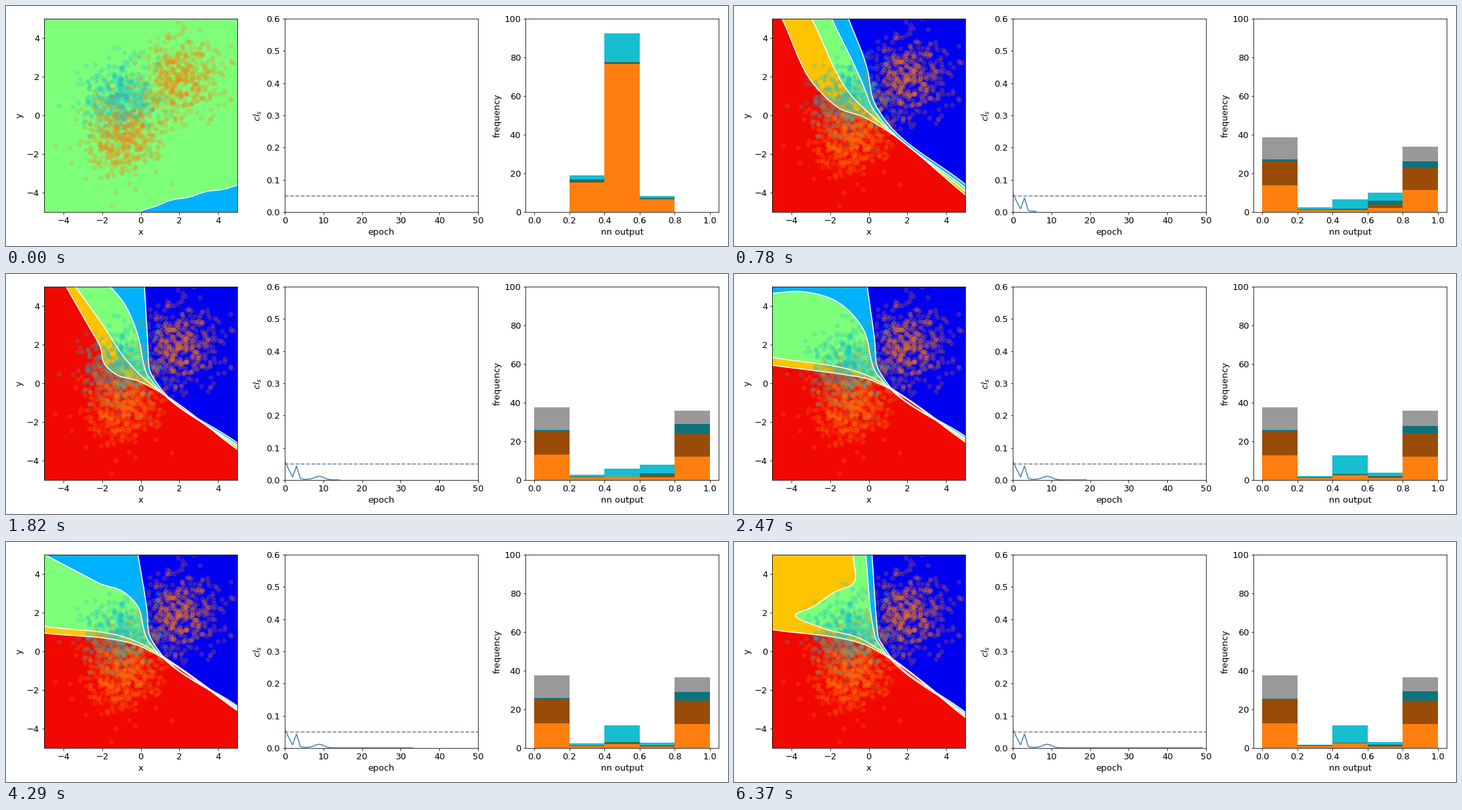
A matplotlib script for the animation above (6500 ms loop, 1080x360 px).

```python
import numpy as np
import matplotlib.pyplot as plt
from matplotlib.animation import FuncAnimation
from matplotlib.patches import Polygon
from matplotlib.path import Path

EPOCHS = 50
POINTS = 500
BINS = np.arange(5) * 0.2 + 0.1
BANDS = plt.get_cmap("jet")(BINS)
OUTSIDE = [(12, -12), (-12, -12), (-12, 12)]

plt.rcParams["font.size"] = 13


def unit(v):
    return v / np.hypot(*v)


def spline(points):
    """Smooth curve with fixed numbers of samples before and after the bend."""
    p = np.array(points, float)
    p = np.vstack([p[0] + 5 * unit(p[0] - p[1]), p, p[-1] + 4 * unit(p[-1] - p[-2])])
    t = np.append(0, np.cumsum(np.hypot(*np.diff(p, axis=0).T)))
    m = np.gradient(p, t, axis=0)
    u = np.append(np.linspace(0, t[-3], 120), np.linspace(t[-3], t[-1], 40)[1:])
    i = np.clip(np.searchsorted(t, u, side="right") - 1, 0, len(t) - 2)
    h = (t[i + 1] - t[i])[:, None]
    s = (u - t[i])[:, None] / h
    return ((2 * s**3 - 3 * s**2 + 1) * p[i] + (s**3 - 2 * s**2 + s) * h * m[i]
            + (3 * s**2 - 2 * s**3) * p[i + 1] + (s**3 - s**2) * h * m[i + 1])


def contour(head, corner, end, r=0.42):
    """From head to a rounded corner, then straight on to end."""
    corner, end = np.array(corner), np.array(end)
    return spline([*head, corner + r * unit(np.array(head[-1]) - corner),
                   corner + r * unit(end - corner), end])


stages = []


def stage(epoch, corner, step, end, gap, *heads):
    """Contours 0.2 to 0.8: corners and right ends are evenly spaced."""
    stages.append((epoch, np.array([
        contour(head, np.add(corner, np.multiply(i, step)), (5, end - i * gap))
        for i, head in enumerate(heads)])))


stage(0, (1.2, 0.8), (-0.5, -0.9), -2, 1.3,
      [(0.2, 5)], [(-2.5, 5)], [(-5, 2)], [(-5, -1)])
stage(6, (0.4, 0.2), (-0.11, -0.13), -3.57, 0.18,
      [(-1.05, 5), (-0.1, 2.5)],
      [(-1.92, 5), (-0.2, 1.35)],
      [(-2.96, 5), (-0.75, 0.85)],
      [(-4.49, 5), (-2.72, 1.45), (-1.4, 0.3)])
stage(10, (0.48, 0.17), (-0.11, -0.08), -3.35, 0.13,
      [(0.42, 5), (0.44, 0.8)],
      [(0.17, 5), (0.2, 0.7)],
      [(-0.11, 5), (-0.08, 0.7)],
      [(-0.77, 5), (-0.98, 2.9), (-1.71, 1.07), (-1.29, 0.41)])
stage(19, (0.52, 0.37), (-0.09, -0.06), -2.74, 0.1,
      [(-0.08, 5), (0.31, 2.21)],
      [(-5, 4.66), (-3.6, 4.75), (-1.6, 4.2), (-0.25, 2.73), (0.2, 0.95)],
      [(-5, 1.34), (-0.4, 0.53)],
      [(-5, 0.93), (-0.4, 0.31)])
stage(26, (0.52, 0.37), (-0.09, -0.06), -2.67, 0.08,
      [(-0.25, 5), (0.31, 2.21)],
      [(-5, 1.9), (-3.83, 2.1), (-1.36, 2.93), (-0.32, 2.5), (0.2, 0.95)],
      [(-5, 1.13), (-0.4, 0.55)],
      [(-5, 0.89), (-0.4, 0.37)])
stage(40, (0.52, 0.37), (-0.09, -0.06), -2.98, 0.08,
      [(-0.04, 5), (0.34, 2.03)],
      [(-0.6, 5), (0.03, 2.38), (0.2, 1)],
      [(-5, 1.45), (-0.4, 0.6)],
      [(-5, 1), (-0.4, 0.41)])
stage(49, (0.52, 0.37), (-0.09, -0.06), -3.15, 0.09,
      [(0.17, 5), (0.44, 1.17)],
      [(-0.15, 5), (0.24, 1.17)],
      [(-0.81, 5), (-0.81, 3.5), (-1.7, 3.1), (-2.9, 2.3), (-3.79, 1.88),
       (-2.5, 1.24), (-0.4, 0.64)],
      [(-5, 1.12), (-0.4, 0.41)])


def contours_at(epoch):
    for (e0, c0), (e1, c1) in zip(stages, stages[1:]):
        if epoch <= e1:
            break
    w = (epoch - e0) / (e1 - e0)
    if e0 == 0:
        w **= 0.4  # the first steps learn fastest
    return c0 + w * (c1 - c0)


def untrained_contour():
    x = np.linspace(0, 5, 60)
    return np.column_stack([x, -5 + 1.36 * (x / 5) ** 0.75
                            + 0.04 * np.sin(3.5 * x - 4)])


def band_shares(points, paths):
    """Share of the points between each pair of neighbouring contours."""
    inside = [p.contains_points(points).sum() for p in paths]
    return np.clip(-np.diff([POINTS, *inside, 0]), 0, None) / POINTS


def histogram(paths):
    """Expected yields; smoothing loses part of both outermost bins."""
    edge = np.array([1, 0, 0, 0, 1])
    up, down = (50 * band_shares(p, paths) * (1 - 0.48 * edge)
                for p in (bkg_up, bkg_down))
    sig = 20 * band_shares(signal, paths) * (1 - 0.35 * edge)
    return up + down, sig, abs(up - down)


def bump(x, centre, width, height):
    return height * np.exp(-((x - centre) / width) ** 2)


epochs = np.arange(EPOCHS)
loss = (bump(epochs, 0, 1.35, 0.056) + bump(epochs, 3, 0.6, 0.042)
        + bump(epochs, 8.9, 1.7, 0.0115) + bump(epochs, 5, 2, 0.002) + 0.0002)

rng = np.random.default_rng(7)
signal, bkg_up, bkg_down = (rng.normal(c, 1, (POINTS, 2))
                            for c in ((-1, 1), (2, 2), (-1, -1)))

fig, (ax_net, ax_loss, ax_hist) = plt.subplots(1, 3, figsize=(15, 5), dpi=72)

regions = [ax_net.add_patch(Polygon(OUTSIDE, fc=c, ec="none")) for c in BANDS[1:]]
borders = [ax_net.plot([], [], color="white", zorder=2)[0] for _ in regions]
for pts, colour in ((signal, "C9"), (bkg_up, "C1"), (bkg_down, "C1")):
    ax_net.scatter(*pts.T, color=colour, alpha=0.2)
ax_net.set(xlim=(-5, 5), ylim=(-5, 5), xlabel="x", ylabel="y")

ax_loss.axhline(0.05, color="slategray", ls="--")
loss_line, = ax_loss.plot([], [], color="steelblue")
ax_loss.set(xlim=(0, 50), ylim=(0, 0.6), xlabel="epoch", ylabel="$cl_s$")

zeros = np.zeros(5)
bkg_bars = ax_hist.bar(BINS, zeros, 0.2, color="C1")
sig_bars = ax_hist.bar(BINS, zeros, 0.2, color="C9")
unc_bars = ax_hist.bar(BINS, zeros, 0.2, color="black", alpha=0.4)
ax_hist.set(xlim=(-0.05, 1.05), ylim=(0, 100), xlabel="nn output", ylabel="frequency")

fig.tight_layout()


def set_bars(bars, bottoms, heights):
    for bar, y, h in zip(bars, bottoms, heights):
        bar.set_y(y)
        bar.set_height(h)


def draw(epoch):
    if epoch == 0:
        # Untrained network: nearly flat output, one low wedge.
        curves, frame, base = [untrained_contour()], [(5, -6), (0, -6)], BANDS[2]
        bkg = np.array([0, 15.9, 77.1, 7, 0])
        sig, unc = 0.2 * bkg, np.array([0, 1.8, 1, 0.7, 0])
    else:
        curves, frame, base = contours_at(epoch), OUTSIDE, BANDS[0]
        paths = [Path(np.vstack([c, frame])) for c in curves]
        bkg, sig, unc = histogram(paths)

    ax_net.set_facecolor(base)
    for i, (region, border) in enumerate(zip(regions, borders)):
        shown = i < len(curves)
        region.set_visible(shown)
        border.set_visible(shown)
        if shown:
            region.set_xy(np.vstack([curves[i], frame]))
            border.set_data(*curves[i].T)

    loss_line.set_data(epochs[:epoch + 1], loss[:epoch + 1])

    set_bars(bkg_bars, zeros, bkg)
    set_bars(sig_bars, bkg, sig)
    set_bars(unc_bars, bkg - unc / 2, unc)


anim = FuncAnimation(fig, draw, frames=EPOCHS, interval=130, repeat=True,
                     init_func=lambda: draw(0))
plt.show()
```
